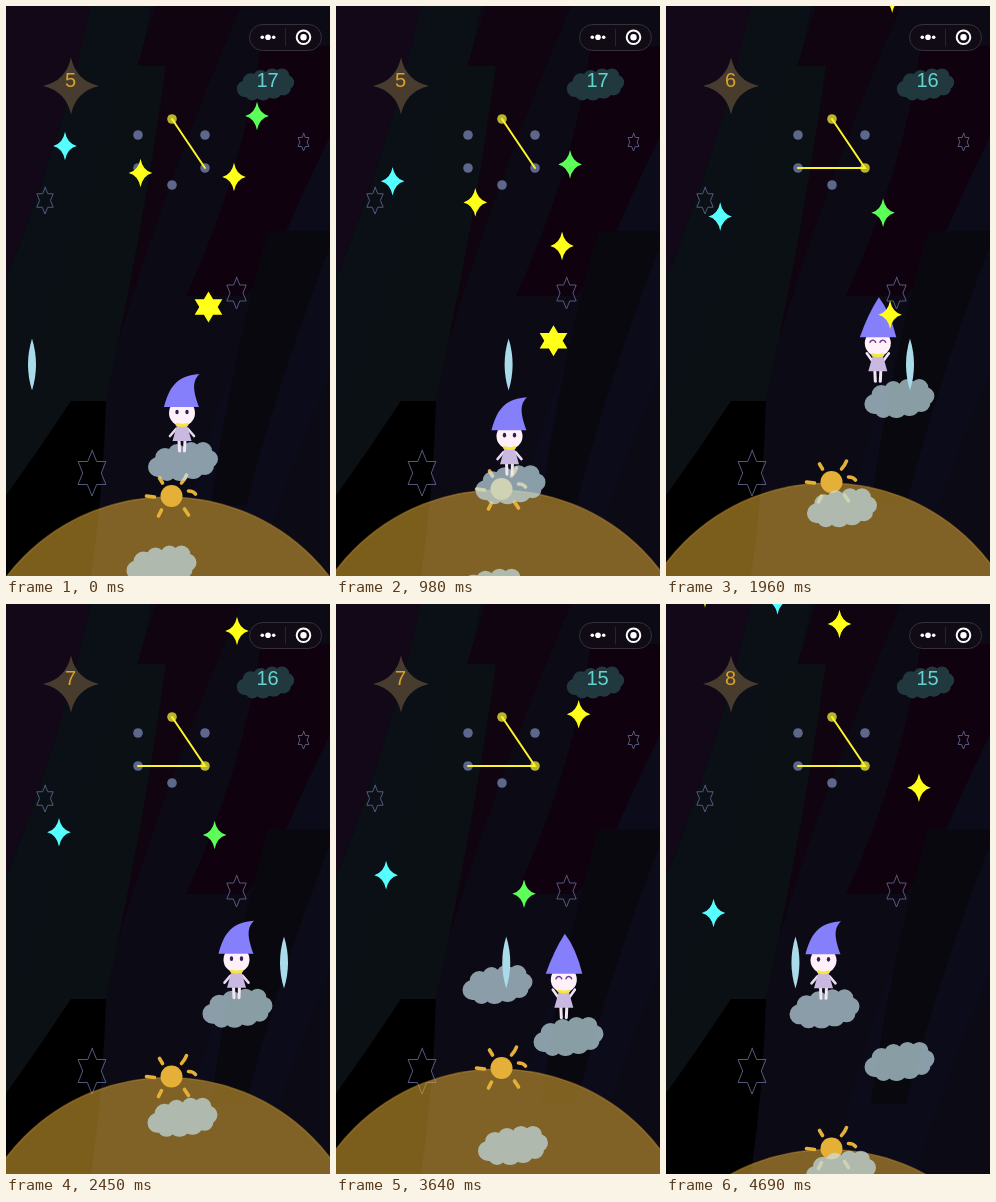
These frames come from a looping animation (324x570 px, 4760 ms). An HTML page with a canvas:

```html
<!DOCTYPE html>
<html lang="en">
<head>
<meta charset="utf-8">
<title>Star catcher</title>
<style>
html, body { margin: 0; width: 100%; height: 100%; overflow: hidden; background: #0b0a13; }
canvas { display: block; width: 324px; height: 570px; }
</style>
</head>
<body>
<canvas id="stage" width="324" height="570"></canvas>
<script>
const ctx = document.getElementById('stage').getContext('2d');
const TAU = Math.PI * 2;
const LOOP = 4760, STEP = 70;
const SLATE = '#5d678b', YELLOW = '#ffff18', CYAN = '#55ffff', GREEN = '#5cff58';
const CLOUD = 'rgba(198,228,238,.68)';

// Taps place a cloud and hold the pointer until the jump ends.
const TAP = [1400, 3625], LAND = [2250, 4450];
const CATCH = { hexagram: 1890, yellow: 2030, green: 4320 };

const clamp = (v, lo = 0, hi = 1) => Math.min(hi, Math.max(lo, v));
const mix = (a, b, u) => a + (b - a) * u;

function track(t, keys) {
  if (t <= keys[0][0]) return keys[0][1];
  for (let i = 1; i < keys.length; i++) {
    const [t0, a] = keys[i - 1], [t1, b] = keys[i];
    if (t <= t1) return mix(a, b, (t - t0) / (t1 - t0));
  }
  return keys[keys.length - 1][1];
}

function at(x, y, draw, sx = 1, sy = sx) {
  ctx.save();
  ctx.translate(x, y);
  ctx.scale(sx, sy);
  draw();
  ctx.restore();
}

function fill(color, path) {
  ctx.fillStyle = color;
  ctx.beginPath();
  path();
  ctx.fill();
}

function disc(x, y, r, color) {
  fill(color, () => ctx.arc(x, y, r, 0, TAU));
}

function stroke(color, width, path, cap = 'round') {
  ctx.strokeStyle = color;
  ctx.lineWidth = width;
  ctx.lineCap = cap;
  ctx.beginPath();
  path();
  ctx.stroke();
}

function line(color, width, ...p) {
  stroke(color, width, () => {
    for (let i = 0; i < p.length; i += 2) ctx.lineTo(p[i], p[i + 1]);
  });
}

// Curved band running from the upper right to the lower left.
function streak(color, x0, x1, y0, x2, x3, y1, bend) {
  fill(color, () => {
    const my = (y0 + y1) / 2;
    ctx.moveTo(x0, y0);
    ctx.lineTo(x1, y0);
    ctx.quadraticCurveTo((x1 + x3) / 2 + bend, my, x3, y1);
    ctx.lineTo(x2, y1);
    ctx.quadraticCurveTo((x0 + x2) / 2 + bend, my, x0, y0);
  });
}

function background() {
  ctx.fillStyle = '#0c0a15';
  ctx.fillRect(0, 0, 324, 570);
  streak('#130817', -90, 85, 0, -130, -25, 330, 18);
  streak('#0b1016', 85, 145, 0, -70, 10, 430, 30);
  streak('#0f0410', 150, 235, 0, 60, 108, 350, -12);
  streak('#0a1014', 118, 160, 60, -30, 75, 500, 12);
  streak('#10010f', 255, 400, 40, 180, 240, 290, 20);
  streak('#0c0b19', 324, 440, 130, 165, 250, 570, -28);
  streak('#08080e', 262, 330, 225, 205, 240, 500, -10);
  streak('#000', 65, 100, 395, -60, 85, 570, 5);
}

function spark(r, ry, color) {
  const k = .18;
  fill(color, () => {
    ctx.moveTo(0, -ry);
    ctx.quadraticCurveTo(r * k, -ry * k, r, 0);
    ctx.quadraticCurveTo(r * k, ry * k, 0, ry);
    ctx.quadraticCurveTo(-r * k, ry * k, -r, 0);
    ctx.quadraticCurveTo(-r * k, -ry * k, 0, -ry);
  });
}

function hexagram(r, sx = 1) {
  for (let i = 0; i < 12; i++) {
    const a = i * TAU / 12, d = i % 2 ? r * .577 : r;
    ctx.lineTo(Math.sin(a) * d * sx, -Math.cos(a) * d);
  }
  ctx.closePath();
}

const PUFFS = [
  [-25, 6, 10], [-18, -3, 10], [-16, 11, 9], [-6, -8, 9], [-3, 9, 11], [0, 0, 14],
  [8, -10, 9], [10, 7, 11], [20, -10, 9], [26, -2, 9], [22, 5, 9]
];

function cloud(x, y, color = CLOUD, scale = 1) {
  at(x, y, () => fill(color, () => {
    for (const [px, py, r] of PUFFS) {
      ctx.moveTo(px + r, py);
      ctx.arc(px, py, r, 0, TAU);
    }
  }), scale);
}

function label(text, x, color) {
  ctx.font = '20px "Liberation Sans", Arial, sans-serif';
  ctx.textAlign = 'center';
  ctx.textBaseline = 'alphabetic';
  ctx.fillStyle = color;
  ctx.fillText(text, x, 80.5);
}

function counters(t) {
  at(65, 80, () => spark(28, 28.5, '#483c2f'));
  cloud(259.5, 78, '#22383f', .82);
  const score = 5 + Object.values(CATCH).filter(c => t >= c).length;
  const clouds = 17 - TAP.filter(c => t >= c).length;
  label(score, 64.5, '#daa12b');
  label(clouds, 261.5, '#62d4d0');
}

function constellation(t) {
  const dots = [[166, 113], [199, 129], [199, 162], [166, 179], [132, 162], [132, 129]];
  const order = t < CATCH.hexagram ? [0, 2] : [0, 2, 4];
  dots.forEach(([x, y], i) => {
    const lit = order.slice(0, -1).includes(i);
    disc(x, y, 4.8, lit ? '#b9b52b' : SLATE);
  });
  line('#fbf32c', 2, ...order.flatMap(i => dots[i]));
}

function planet(t) {
  const drop = clamp((t - CATCH.green) / 280);
  const top = 491 - .00714 * t + 88 * drop * (2 - drop);
  const R = 203.5;
  fill('rgba(228,172,52,.54)', () => ctx.arc(162, top + R, R, 0, TAU));
  stroke('rgba(190,140,50,.45)', 1.5, () => ctx.arc(162, top + R, R, 0, TAU));
  at(165.5, top - 1, sun);
}

function sun() {
  const gold = '#e4b038';
  disc(0, 0, 11, gold);
  line(gold, 3.6, -9, -13, -12, -18);
  line(gold, 3.6, 10, -13, 13, -17, 15, -21);
  stroke(gold, 3.6, () => {
    ctx.moveTo(17, -5);
    ctx.quadraticCurveTo(22, -5, 24, -2);
  });
  line(gold, 3.6, 13, 13, 17, 19);
  line(gold, 3.6, -10, 14, -13, 20);
  line(gold, 3.6, -17, 1, -25, 0);
}

const cloudX = [
  t => track(t, [[0, 177], [980, 174.5], [1540, 175.5], [2450, 176.5], [3150, 174.5], [3640, 177], [4690, 175]]),
  t => track(t, [[1540, 235], [2450, 231.5], [3150, 234.5], [3640, 232.5], [4690, 233.5]]),
  t => track(t, [[3640, 161.5], [4690, 158.5]])
];
const cloudY = [
  t => 455 + .0236 * t,
  t => 382 + .0238 * (t - 1540),
  t => 380 + .0232 * (t - 3640)
];

function clouds(t) {
  cloud(155.5, 558.5 + .0236 * t);
  cloudX.forEach((x, i) => {
    if (!i || t >= TAP[i - 1]) cloud(x(t), cloudY[i](t));
  });
}

const JUMPS = [
  { start: 1400, end: LAND[0], height: 49 },
  { start: 3595, end: LAND[1], height: 28 }
];

function girl(t) {
  const base = JUMPS.filter(j => t >= j.end).length;
  const jump = JUMPS[base];
  const stand = (i, time) => [cloudX[i](time) - 1, cloudY[i](time) - 48];
  let [x, y] = stand(base, t);
  const jumping = jump && t >= jump.start;
  if (jumping) {
    const u = (t - jump.start) / (jump.end - jump.start);
    const from = stand(base, jump.start), to = stand(base + 1, jump.end);
    x = mix(from[0], to[0], u);
    y = mix(from[1], to[1], u) - 4 * jump.height * u * (1 - u);
  }
  at(x, y, () => figure(jumping));
}

function figure(jumping) {
  const skin = '#fff0fa';
  for (const s of [-1, 1]) {
    line('#f2e6f5', 3, s * 3, 27, s * 2.5, 38);
    if (jumping) line('#f2e6f5', 2.6, s * 6, 17, s * 11, 10);
    else line('#e7daf0', 2.6, s * 6, 16, s * 12, 23);
  }
  fill('#c9b8df', () => {
    ctx.moveTo(-5, 12);
    ctx.lineTo(5, 12);
    ctx.lineTo(9.5, 28);
    ctx.lineTo(-9.5, 28);
  });
  disc(0, 0, 13, skin);
  line('#f8e63c', 3, -5, 11.5, 0, 12.5, 5, 11.5);
  for (const s of [-1, 1]) {
    if (jumping) stroke('#6b3f8c', 1.5, () => ctx.arc(s * 5, 0, 3, Math.PI * 1.1, Math.PI * 1.9));
    else fill('#2c2150', () => ctx.ellipse(s * 5, -1, 1.7, 2.3, 0, 0, TAU));
  }
  fill('#867ffb', () => {
    ctx.moveTo(-18, -6);
    if (jumping) {
      ctx.quadraticCurveTo(-10, -29, 1, -46);
      ctx.quadraticCurveTo(12, -32, 18.5, -6);
    } else {
      ctx.bezierCurveTo(-13, -23, -8, -37, 17.5, -39);
      ctx.bezierCurveTo(9, -31, 12, -20, 17, -6);
    }
  });
}

// Each star passes (x, y) at time t0 and is visible from the start until "end".
const STARS = [
  { color: CYAN, t0: 0, x: 59, y: 140, vx: -.00245, vy: .03603, end: LOOP },
  { color: GREEN, t0: 0, x: 251, y: 110, vx: -.0173, vy: .0494, end: CATCH.green },
  { color: YELLOW, t0: 0, x: 134.5, y: 167, vx: .0049, vy: .03, end: 1960 },
  { color: YELLOW, t0: 0, x: 228, y: 171, vx: -.002, vy: .0703, end: CATCH.yellow },
  { color: YELLOW, t0: 2450, x: 231, y: 27, vx: .0098, vy: .07, end: LOOP },
  { color: YELLOW, t0: 4690, x: 173.5, y: 20, vx: 0, vy: .06, end: LOOP },
  { color: YELLOW, t0: 4690, x: 39, y: -10.5, vx: 0, vy: .05, end: LOOP },
  { color: CYAN, t0: 4690, x: 111.5, y: -3.5, vx: 0, vy: .04, end: LOOP }
];

function stars(t) {
  for (const s of STARS) {
    if (t >= s.end) continue;
    const dt = t - s.t0;
    at(s.x + s.vx * dt, s.y + s.vy * dt, () => spark(11.8, 14.3, s.color));
  }
  if (t < CATCH.hexagram) {
    at(202.5 + .0153 * t, 301 + .0345 * t, () => fill(YELLOW, () => hexagram(15.5, 1.03)));
  }
}

function pointer(t) {
  const held = TAP.reduce((sum, tap, i) => sum + clamp(t - tap, 0, LAND[i] - tap), 0);
  const d = Math.abs(.17 * (t - held) - 10);
  const x = 16 + (d > 308 ? 616 - d : d);
  at(x, 358.5, () => fill('#a9dbe8', () => {
    ctx.moveTo(0, -26);
    ctx.quadraticCurveTo(8, 0, 0, 26);
    ctx.quadraticCurveTo(-8, 0, 0, -26);
  }));
}

function capsule() {
  const path = () => ctx.roundRect(243.5, 18.5, 72, 26, 13);
  fill('#100b15', path);
  stroke('#35303c', 1, path);
  line('#29242f', 1, 279.5, 23, 279.5, 40);
  disc(256.3, 31.3, 1.8, '#fff');
  disc(262, 31.3, 2.8, '#fff');
  disc(267.7, 31.3, 1.8, '#fff');
  stroke('#fff', 2, () => ctx.arc(297.5, 31.3, 6.8, 0, TAU));
  disc(297.5, 31.3, 3.2, '#fff');
}

function draw(t) {
  background();
  for (const [x, y, r] of [[39, 194.5, 13.5], [297.5, 136, 9], [230.5, 287, 16], [86, 467, 23]]) {
    at(x, y, () => stroke('#535a7c', 1, () => hexagram(r, .7)));
  }
  counters(t);
  constellation(t);
  planet(t);
  clouds(t);
  girl(t);
  stars(t);
  pointer(t);
  capsule();
}

function frame() {
  const t = performance.now() % LOOP;
  draw(Math.floor(t / STEP) * STEP);
  requestAnimationFrame(frame);
}
frame();
</script>
</body>
</html>
```
